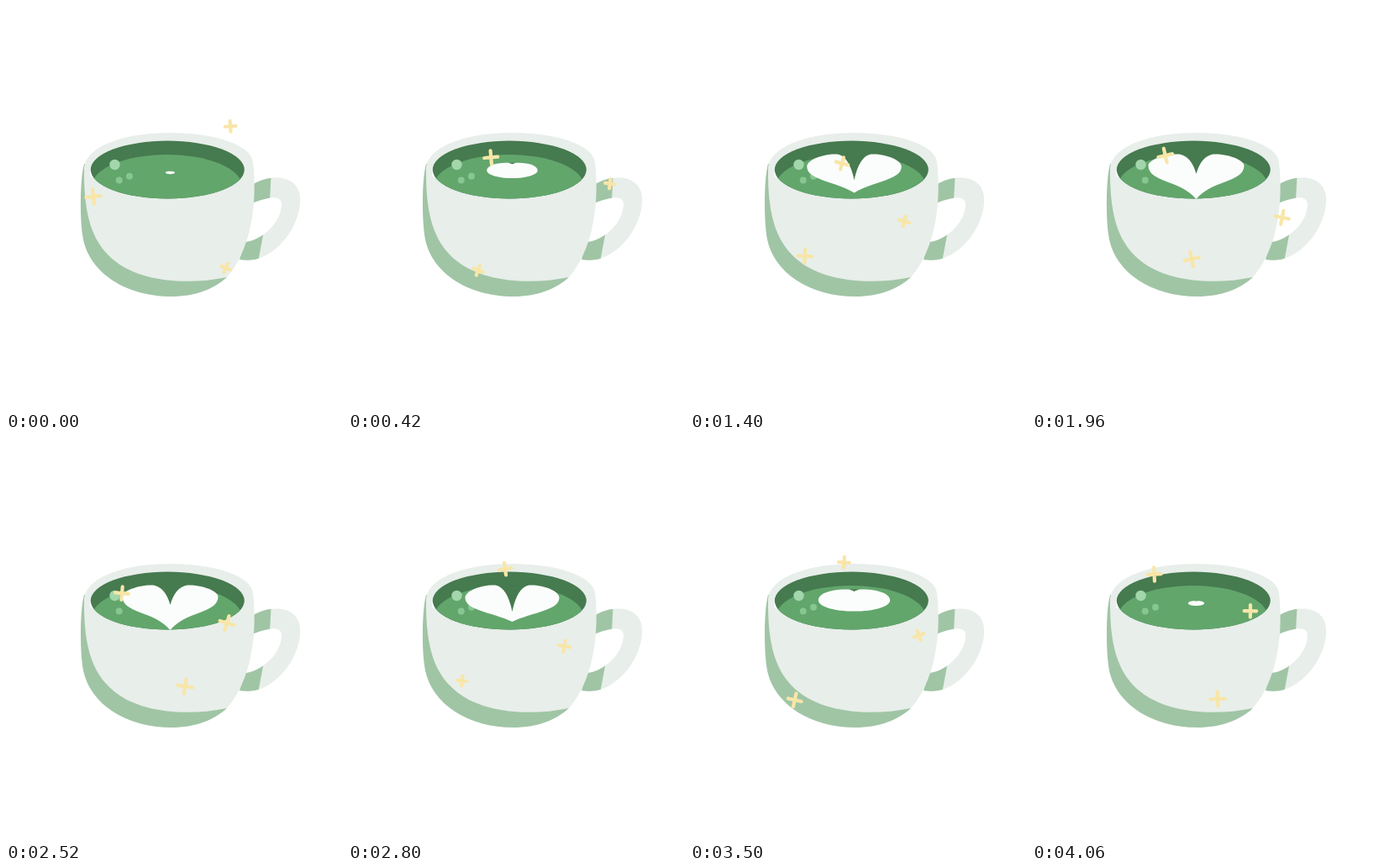
An HTML page for the animation above (4200 ms loop, 400x480 px).

```html
<!DOCTYPE html>
<html lang="en">
<head>
<meta charset="utf-8">
<title>Matcha latte</title>
<style>
  html, body { margin: 0; width: 100%; height: 100%; overflow: hidden; background: #fff; }
  svg { display: block; width: 100%; height: 100%; }
</style>
</head>
<body>
<svg viewBox="0 0 400 480">
  <defs>
    <path id="handle" d="M290 215C303 206 316 204 325 204.5C345 206 352 221 350 236C347 265 325 293 300 301C293 303 286 303 278 302L284 281C300 281 326 262 328 238C329 226 317 225 290 236Z"/>
    <clipPath id="shade"><path d="M270 195H316L314 232L306 273L300 305H270Z"/></clipPath>
    <clipPath id="bowl"><ellipse cx="192.3" cy="195" rx="91.5" ry="34.5"/></clipPath>
  </defs>
  <use href="#handle" fill="#e8eeea"/>
  <use href="#handle" fill="#a0c5a5" clip-path="url(#shade)"/>
  <path fill="#a0c5a5" d="M93 188C88 206 88 250 91 272C96 315 140 346 197 346C225 346 248 337 263 323L200 200Z"/>
  <path fill="#e8eeea" d="M93 192C97 165 145 151 195 151C250 151 292 166 294 186C297 210 296 240 291 262C286 287 276 308 263 323C215 333 160 328 130 304C105 284 92 255 93 192Z"/>
  <ellipse cx="102" cy="200" rx="2" ry="4" fill="#fff"/>
  <g clip-path="url(#bowl)">
    <rect x="95" y="155" width="200" height="80" fill="#467a4f"/>
    <ellipse cx="191.5" cy="214" rx="89" ry="37" fill="#62a66c"/>
  </g>
  <circle cx="129.5" cy="189" r="6.2" fill="#a3d6ab"/>
  <circle cx="134.7" cy="207.5" r="4" fill="#88c691"/>
  <circle id="bubble" cx="147" cy="202.8" r="4" fill="#88c691"/>
  <g id="latte">
    <path id="gap" fill="#467a4f"/>
    <path id="milk" fill="#fbfdfc"/>
  </g>
  <path id="sparkles" fill="none" stroke="#f8e6a8" stroke-width="4.2" stroke-linecap="round"/>
</svg>
<script>
const STEP = 140, STEPS = 30, CENTER = 195.5;
const set = (id, name, value) => document.getElementById(id).setAttribute(name, value);
const mix = (a, b, t) => a + (b - a) * t;
const ramp = (p, from, to) => Math.min(1, Math.max(0, (p - from) / (to - from)));

// Grows a drop, splits its top edge, then pulls the bottom into a heart.
function drawMilk(p) {
  const grow = ramp(p, 0, 6), split = ramp(p, 6, 7.5), heart = ramp(p, 7.5, 11.5);
  const notch = 180 + 20 * split + 8 * Math.sin(Math.PI * heart);
  const width = mix(55, 57, heart), tip = mix(210, 230, heart);

  const curves = side => {
    const pt = (dx, y) => `${CENTER + side * dx} ${y} `;
    const shoulder = pt(mix(8, 20, split), 176.5);
    const dip = pt(6 * split, 179);
    const top = pt(36, 175.5) + pt(width, 183) + pt(width, mix(193, 190, heart));
    const bottom = pt(width, mix(203, 210, heart)) + pt(mix(30, 19, heart), mix(210, 207, heart)) + pt(0, tip);
    return {
      gap: `M${pt(0, notch)}Q${dip}${shoulder}L${pt(0, 176.5)}Z`,
      milk: `M${pt(0, notch)}Q${dip}${shoulder}C${top}C${bottom}Z`
    };
  };

  const left = curves(-1), right = curves(1), scale = mix(0.1, 1, grow);
  set("gap", "d", left.gap + right.gap);
  set("milk", "d", left.milk + right.milk);
  set("latte", "transform",
    `translate(${CENTER} ${mix(198.5, 193, grow)}) scale(${scale}) translate(${-CENTER} -193)`);
  set("bubble", "visibility", p > 10.5 ? "hidden" : "visible");
}

function seeded(seed) {
  return () => {
    seed = (seed * 16807) % 2147483647;
    return seed / 2147483647;
  };
}

function cross(x, y, r, tilt) {
  const c = r * Math.cos(tilt), s = r * Math.sin(tilt);
  return `M${x - c} ${y - s}L${x + c} ${y + s}M${x + s} ${y - c}L${x - s} ${y + c}`;
}

// Three sparkles, spread evenly around the cup and scattered anew each step.
function drawSparkles(step) {
  const random = seeded(7919 * (step + 1));
  const turn = random() * Math.PI * 2;
  let d = "";
  for (let i = 0; i < 3; i++) {
    const angle = turn + (i + random() * 0.4) * Math.PI * 2 / 3;
    const reach = mix(0.45, 1, random());
    const x = 200 + 129 * reach * Math.cos(angle);
    const y = 238 + 115 * reach * Math.sin(angle);
    d += cross(x, y, mix(5.5, 9, random()), mix(-0.4, 0.4, random()));
  }
  set("sparkles", "d", d);
}

function draw() {
  const step = Math.floor(performance.now() / STEP) % STEPS;
  drawMilk(Math.min(step, STEPS - 0.5 - step));
  drawSparkles(step);
  requestAnimationFrame(draw);
}
draw();
</script>
</body>
</html>
```
